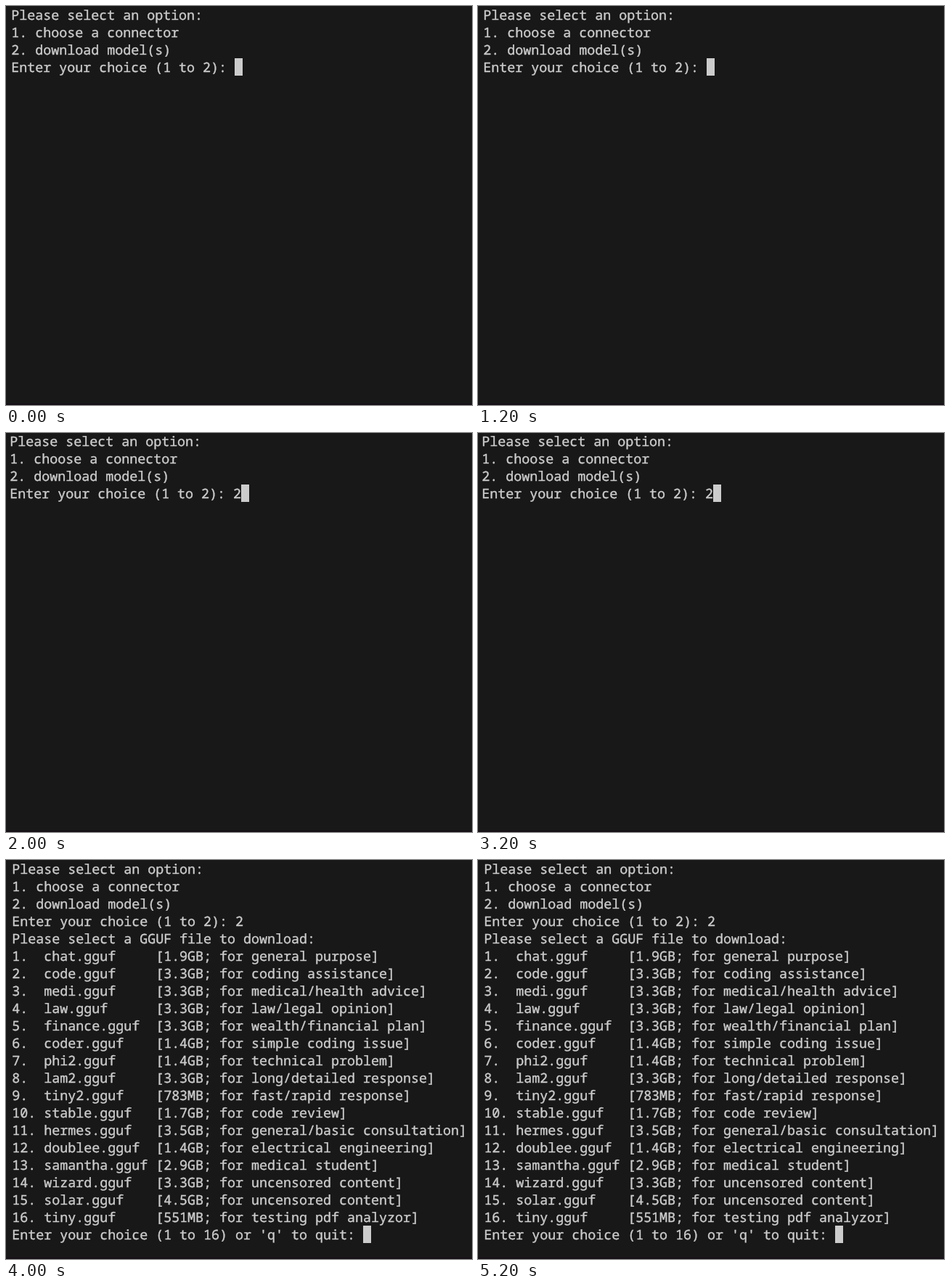
An HTML page for the animation above (6000 ms loop, 642 by 550 pixels).

```html
<!DOCTYPE html>
<html lang="en">
<head>
<meta charset="utf-8">
<title>Terminal menu</title>
<style>
  html, body { margin: 0; width: 100%; height: 100%; overflow: hidden; background: #181818; }
  svg { display: block; }
  text {
    font: 18.333px "Noto Sans Mono", "DejaVu Sans Mono", monospace;
    font-variant-ligatures: none;
    text-rendering: geometricPrecision;
    white-space: pre;
    fill: #ccc;
    stroke: #ccc;
    stroke-width: 0.4px;
  }
</style>
</head>
<body>
<svg id="stage" width="642" height="550" viewBox="0 0 642 550">
  <rect width="642" height="550" fill="#181818"/>
  <rect y="548" width="642" height="2" fill="#151015"/>
</svg>
<script>
const CELL = 11, ROW = 24, BASE = 19, LOOP = 6000;
const stage = document.getElementById('stage');

const menu = [
  'Please select an option:',
  '1. choose a connector',
  '2. download model(s)'
];
const ask = 'Enter your choice (1 to 2): ';

const models = [
  ['chat', '1.9GB', 'general purpose'],
  ['code', '3.3GB', 'coding assistance'],
  ['medi', '3.3GB', 'medical/health advice'],
  ['law', '3.3GB', 'law/legal opinion'],
  ['finance', '3.3GB', 'wealth/financial plan'],
  ['coder', '1.4GB', 'simple coding issue'],
  ['phi2', '1.4GB', 'technical problem'],
  ['lam2', '3.3GB', 'long/detailed response'],
  ['tiny2', '783MB', 'fast/rapid response'],
  ['stable', '1.7GB', 'code review'],
  ['hermes', '3.5GB', 'general/basic consultation'],
  ['doublee', '1.4GB', 'electrical engineering'],
  ['samantha', '2.9GB', 'medical student'],
  ['wizard', '3.3GB', 'uncensored content'],
  ['solar', '4.5GB', 'uncensored content'],
  ['tiny', '551MB', 'testing pdf analyzor']
].map(([name, size, use], i) =>
  `${i + 1}.`.padEnd(4) + `${name}.gguf`.padEnd(14) + `[${size}; for ${use}]`);

// The cursor always follows the last line.
const screens = [
  { start: 0, x: 7, y: 0, lines: [...menu, ask] },
  { start: 2000, x: 5, y: -1, lines: [...menu, ask + '2'] },
  { start: 4000, x: 8, y: 0, lines: [
    ...menu, ask + '2',
    'Please select a GGUF file to download:',
    ...models,
    "Enter your choice (1 to 16) or 'q' to quit: "
  ] }
];

function add(parent, tag, attrs) {
  const el = document.createElementNS('http://www.w3.org/2000/svg', tag);
  for (const key in attrs) el.setAttribute(key, attrs[key]);
  return parent.appendChild(el);
}

const groups = screens.map(({ x, y, lines }) => {
  const group = add(stage, 'g', { transform: `translate(${x} ${y})` });
  lines.forEach((line, row) => {
    add(group, 'text', { x: 0.2, y: row * ROW + BASE }).textContent = line;
  });
  const last = lines.length - 1;
  add(group, 'rect', {
    x: lines[last].length * CELL, y: last * ROW,
    width: CELL, height: ROW, fill: '#ccc'
  });
  return group;
});

function draw() {
  const time = performance.now() % LOOP;
  const current = screens.findLastIndex(s => time >= s.start);
  groups.forEach((g, i) => { g.style.display = i === current ? '' : 'none'; });
  requestAnimationFrame(draw);
}
draw();
</script>
</body>
</html>
```
